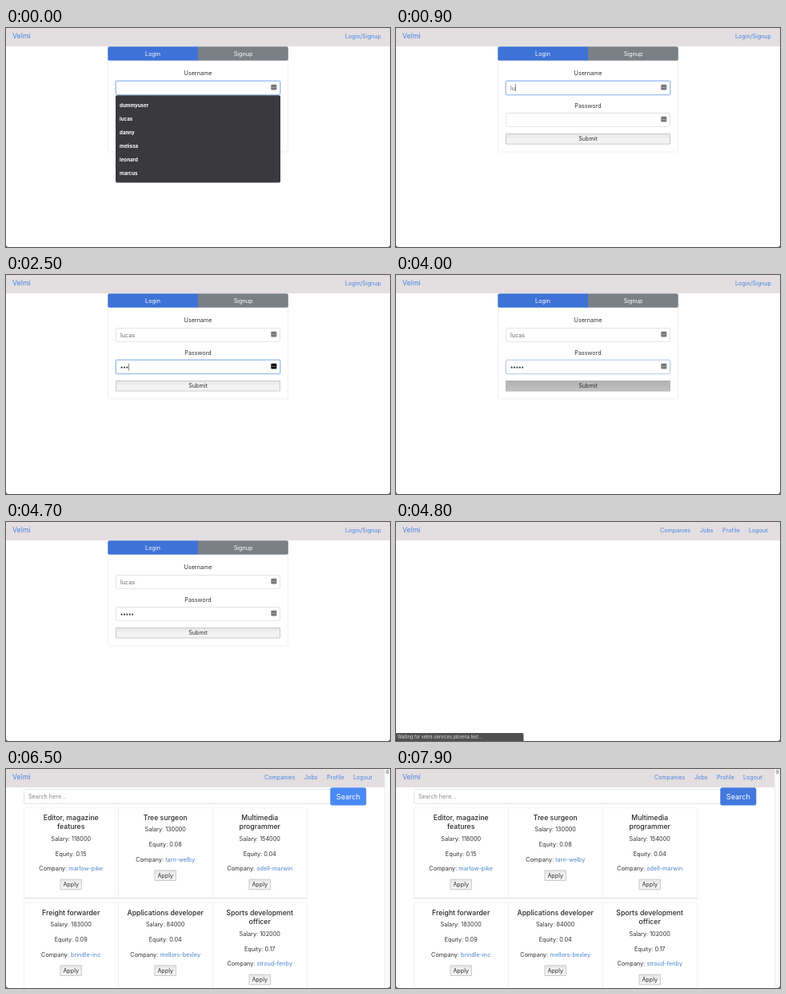
An HTML page with a canvas that plays this animation: 480 px wide and 274 px high, repeating every 8 s.

```html
<!DOCTYPE html>
<html lang="en">
<head>
<meta charset="utf-8">
<title>Job board</title>
<style>
html, body { margin: 0; width: 100%; height: 100%; overflow: hidden; background: #fff; }
canvas { display: block; width: 480px; height: 274px; }
</style>
</head>
<body>
<canvas id="stage"></canvas>
<script>
const W = 480, H = 274, LOOP = 8000;
const LINK = '#4a86e4', INK = '#2c3034';
const canvas = document.getElementById('stage');
const scale = window.devicePixelRatio || 1;
canvas.width = W * scale;
canvas.height = H * scale;
const ctx = canvas.getContext('2d');

const USER = 'lucas';
const SUGGESTIONS = ['dummyuser', USER, 'danny', 'melissa', 'leonard', 'marcus'];
const USER_KEYS = [900, 900, 1100, 1200, 1400];
const PASS_KEYS = [1900, 2000, 2500, 2700, 2900];
const NAV = [['Companies', 323], ['Jobs', 373], ['Profile', 401], ['Logout', 434]];
const JOBS = [
  { title: ['Editor, magazine', 'features'], salary: 118000, equity: '0.15', company: 'marlow-pike' },
  { title: ['Tree surgeon'], salary: 130000, equity: '0.08', company: 'tarn-welby' },
  { title: ['Multimedia', 'programmer'], salary: 154000, equity: '0.04', company: 'odell-marwin' },
  { title: ['Freight forwarder'], salary: 183000, equity: '0.09', company: 'brindle-inc' },
  { title: ['Applications developer'], salary: 84000, equity: '0.04', company: 'mellors-bexley' },
  { title: ['Sports development', 'officer'], salary: 102000, equity: '0.17', company: 'stroud-fenby' }
];

const clamp = v => Math.max(0, Math.min(1, v));
const typed = (keys, t) => keys.filter(k => t >= k).length;

function setFont(size, weight = 400) {
  ctx.font = `${weight} ${size}px Inter, Roboto, sans-serif`;
}

// y is the middle of the capital letters
function text(str, x, y, { size = 7.2, weight = 400, color = INK, align = 'left' } = {}) {
  setFont(size, weight);
  ctx.textAlign = align;
  ctx.fillStyle = color;
  ctx.fillText(str, x, y + size * 0.36);
  return ctx.measureText(str).width;
}

function box(x, y, w, h, r, fill, stroke, line = 1) {
  ctx.beginPath();
  ctx.roundRect(x, y, w, h, r);
  if (fill) { ctx.fillStyle = fill; ctx.fill(); }
  if (stroke) { ctx.strokeStyle = stroke; ctx.lineWidth = line; ctx.stroke(); }
}

function rect(x, y, w, h, color) {
  ctx.fillStyle = color;
  ctx.fillRect(x, y, w, h);
}

function dot(x, y, r, color) {
  ctx.fillStyle = color;
  ctx.beginPath();
  ctx.arc(x, y, r, 0, Math.PI * 2);
  ctx.fill();
}

function header(width) {
  rect(0, 0, width, 23, '#e3dedf');
  text('Velmi', 8, 10.3, { size: 8.8, color: LINK });
}

function input(y, focus, iconColor) {
  box(137.5, y + 0.5, 205, 16.8, 2, '#fff', '#e2e4e6');
  if (focus > 0) {
    ctx.globalAlpha = focus;
    box(136.7, y - 0.3, 206.6, 18.4, 2.5, null, '#d3e4fa', 1.4);
    box(137.4, y + 0.4, 205.2, 17, 2, null, '#97bdec', 0.9);
    ctx.globalAlpha = 1;
  }
  box(331.3, y + 4.7, 7, 6.8, 1, iconColor);
  for (let i = 0; i < 3; i++) dot(333 + i * 1.8, y + 8.3, 0.5, '#ddd');
}

function caret(x, y) {
  rect(x, y - 4.5, 0.7, 9, '#555');
}

function button(x, y, w, h, label, pressed) {
  const shade = ctx.createLinearGradient(0, y, 0, y + h);
  shade.addColorStop(0, pressed ? '#b0b0b0' : '#e6e6e6');
  shade.addColorStop(0.55, pressed ? '#bababa' : '#f3f3f3');
  shade.addColorStop(1, pressed ? '#c2c2c2' : '#f3f3f3');
  box(x + 0.5, y + 0.5, w - 1, h - 1, 0, shade, pressed ? '#b4b4b4' : '#cacaca');
  text(label, x + w / 2, y + h / 2, { align: 'center' });
}

function loginPage(t) {
  const center = { align: 'center' };
  const white = { align: 'center', color: '#fff' };
  const swap = clamp((t - 1500) / 200);
  const passFocus = swap * (1 - clamp((t - 3900) / 200));

  header(W);
  text('Login/Signup', 469, 10.3, { color: LINK, align: 'right' });

  box(127.5, 30, 225, 125, 2, '#fff', '#f0f0f0');
  box(127.3, 23.3, 112.7, 17.5, [2, 0, 0, 2], '#3e72d6');
  box(240, 23.3, 112.8, 17.5, [0, 2, 2, 0], '#7b8087');
  text('Login', 183.5, 32.2, white);
  text('Signup', 296.5, 32.2, white);

  text('Username', 240, 56.8, center);
  input(66, 1 - swap, '#777');
  const name = USER.slice(0, typed(USER_KEYS, t));
  const nameWidth = text(name, 143, 75, { color: '#62686e' });
  if (t >= 400 && t < 1600) caret(143 + nameWidth, 74.7);

  text('Password', 240, 97.1, center);
  input(106, passFocus, t >= 1600 && t < 3700 ? '#0c0c0c' : '#777');
  const count = typed(PASS_KEYS, t);
  for (let i = 0; i < count; i++) dot(144.6 + i * 3.4, 115.7, 1.1, '#3d4247');
  if (t >= 1700 && t < 3400) caret(143 + count * 3.4, 115.3);

  button(137, 132, 206, 13.6, 'Submit', t >= 3900 && t < 4100);

  if (t < 900) {
    box(137, 84.3, 206, 109.2, 2, '#3a393d');
    SUGGESTIONS.forEach((s, i) =>
      text(s, 142, 97 + i * 17, { size: 6.2, weight: 700, color: '#fff' }));
  }
}

function jobCard(job, x, y) {
  const mid = x + 59.2;
  const style = { align: 'center', size: 7.25 };
  box(x + 0.5, y + 0.5, 118, 113, 1, '#fff', '#f0f0f0');
  rect(x, y + 113, 119, 1, '#dcdcdc');

  let row = y + 13;
  job.title.forEach((line, i) =>
    text(line, mid, row + i * 11.3, { size: 8.7, weight: 500, align: 'center', color: '#24282c' }));
  row += (job.title.length - 1) * 11.3 + 14.8;
  text('Salary: ' + job.salary, mid, row, style);
  text('Equity: ' + job.equity, mid, row + 18.8, style);

  setFont(7.25);
  const label = 'Company: ';
  const labelWidth = ctx.measureText(label).width;
  const start = mid - (labelWidth + ctx.measureText(job.company).width) / 2;
  text(label, start, row + 37.7, { size: 7.25 });
  text(job.company, start + labelWidth, row + 37.7, { size: 7.25, color: '#4b86c6' });
  button(mid - 13.7, row + 50.6, 27.4, 13.6, 'Apply', false);
}

function nav(shift) {
  NAV.forEach(([label, x]) => text(label, x + shift, 10.3, { color: LINK }));
}

function jobsPage(t) {
  header(473);
  nav(0);
  rect(473, 0, 7, H, '#fafafa');
  rect(473, 0, 0.6, H, '#e6e6e6');
  box(474.8, 0.5, 4, 6, 2, '#bfbfbf');

  box(22.5, 25.5, 385, 18, 2, '#fff', '#e0e2e4');
  text('Search here...', 28, 34.6, { color: '#80868c' });
  box(405.3, 23.2, 45, 22.4, 2.5, t >= 7900 ? '#4379de' : '#4b89f6');
  text('Search', 427.8, 34.6, { size: 9, color: '#fff', align: 'center' });

  JOBS.forEach((job, i) => jobCard(job, 22 + (i % 3) * 118, i < 3 ? 48 : 167));
  rect(20, 44.5, 360, 4, '#fff');
}

function statusBar(alpha) {
  ctx.globalAlpha = alpha;
  box(0, 264, 159.5, 10, [0, 2, 0, 0], '#3c3d40');
  ctx.globalAlpha = 1;
  text('Waiting for velmi-services.plovena.test...', 2, 268.8, { size: 5.5, color: '#dedede' });
}

function windowCorners() {
  ctx.fillStyle = '#333';
  for (const [x, dir] of [[0, 1], [W, -1]]) {
    ctx.beginPath();
    ctx.moveTo(x, H - 3);
    ctx.quadraticCurveTo(x, H, x + 3 * dir, H);
    ctx.lineTo(x, H);
    ctx.fill();
  }
}

function draw(t) {
  ctx.setTransform(scale, 0, 0, scale, 0, 0);
  rect(0, 0, W, H, '#fff');
  if (t < 4800) {
    loginPage(t);
  } else if (t < 5100) {
    header(W);
    nav(7);
    statusBar(0.9);
  } else {
    jobsPage(t);
    if (t < 5200) statusBar(0.55);
  }
  windowCorners();
}

function tick() {
  draw(Math.floor((performance.now() % LOOP) / 100) * 100);
  requestAnimationFrame(tick);
}
tick();
</script>
</body>
</html>
```
